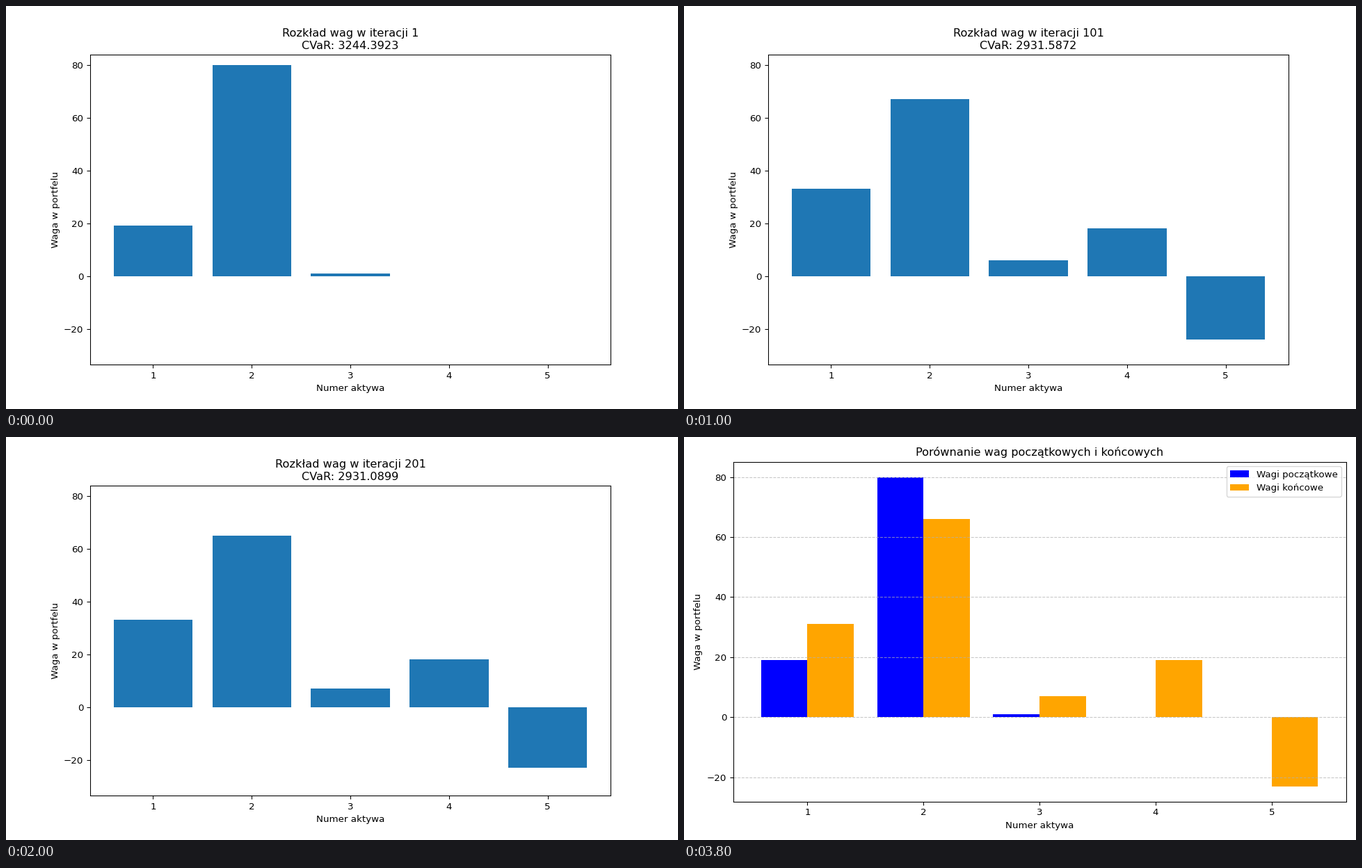
Animation, 966 px wide and 580 px high, one loop 4850 ms. Source, as a matplotlib script:

```python
import numpy as np
import matplotlib.pyplot as plt
from matplotlib.animation import FuncAnimation

STAGE = np.array([966, 580])
DPI = 96.6
INTERVAL = 50
RUN_FRAMES = 76
TOTAL_FRAMES = 97
SETTLED = 44
STEP = 5

START = np.array([19, 80, 1, 0, 0])
END = np.array([31, 66, 7, 19, -23])
SWING = np.array([5, 4, -5, -10, 6])
START_CVAR, END_CVAR = 3244.3923, 2929.5980


def simulate():
    """Search that leaves START, swings twice around END and settles there."""
    frames = np.arange(RUN_FRAMES)
    fade = np.clip(1 - frames / 10, 0, 1) ** 2
    swing = np.interp(frames, [0, 12, 20, 26, 34], [0, 1, 0, 1, 0])
    noise = np.random.default_rng(4).integers(-1, 2, (RUN_FRAMES, 5))
    noise[(frames == 0) | (frames >= SETTLED)] = 0
    path = END + np.outer(fade, START - END) + np.outer(swing, SWING)
    weights = np.rint(path).astype(int) + noise
    weights[:, 0] = 100 - weights[:, 1:].sum(axis=1)

    distance = ((weights - END) ** 2).sum(axis=1)
    cvar = END_CVAR + (START_CVAR - END_CVAR) * distance / distance[0]
    return weights, cvar


def label_axes(ax):
    ax.set_xlabel("Numer aktywa")
    ax.set_ylabel("Waga w portfelu")


weights, cvar = simulate()
assets = np.arange(1, 6)

# The small margin keeps the pixel size from being rounded down.
fig, summary_ax = plt.subplots(figsize=(STAGE + 0.01) / DPI, dpi=DPI)
summary_ax.bar(assets - 0.2, START, 0.4, color="blue",
               label="Wagi początkowe")
summary_ax.bar(assets + 0.2, END, 0.4, color="orange", label="Wagi końcowe")
summary_ax.set_title("Porównanie wag początkowych i końcowych")
summary_ax.grid(axis="y", linestyle="--", alpha=0.7)
summary_ax.legend(loc="upper right")
label_axes(summary_ax)
fig.tight_layout()

run_ax = fig.add_axes([0.125, 0.11, 0.775, 0.77])
bars = run_ax.bar(assets, START)
run_ax.set_xlim(0.36, 5.64)
run_ax.set_ylim(-28 * 1.2, 80 * 1.05)
label_axes(run_ax)


def update(frame):
    running = frame < RUN_FRAMES
    run_ax.set_visible(running)
    summary_ax.set_visible(not running)
    if running:
        for bar, weight in zip(bars, weights[frame]):
            bar.set_height(weight)
        run_ax.set_title(f"Rozkład wag w iteracji {frame * STEP + 1}\n"
                         f"CVaR: {cvar[frame]:.4f}")


anim = FuncAnimation(fig, update, frames=TOTAL_FRAMES, interval=INTERVAL,
                     repeat=True, repeat_delay=0)
plt.show()
```
